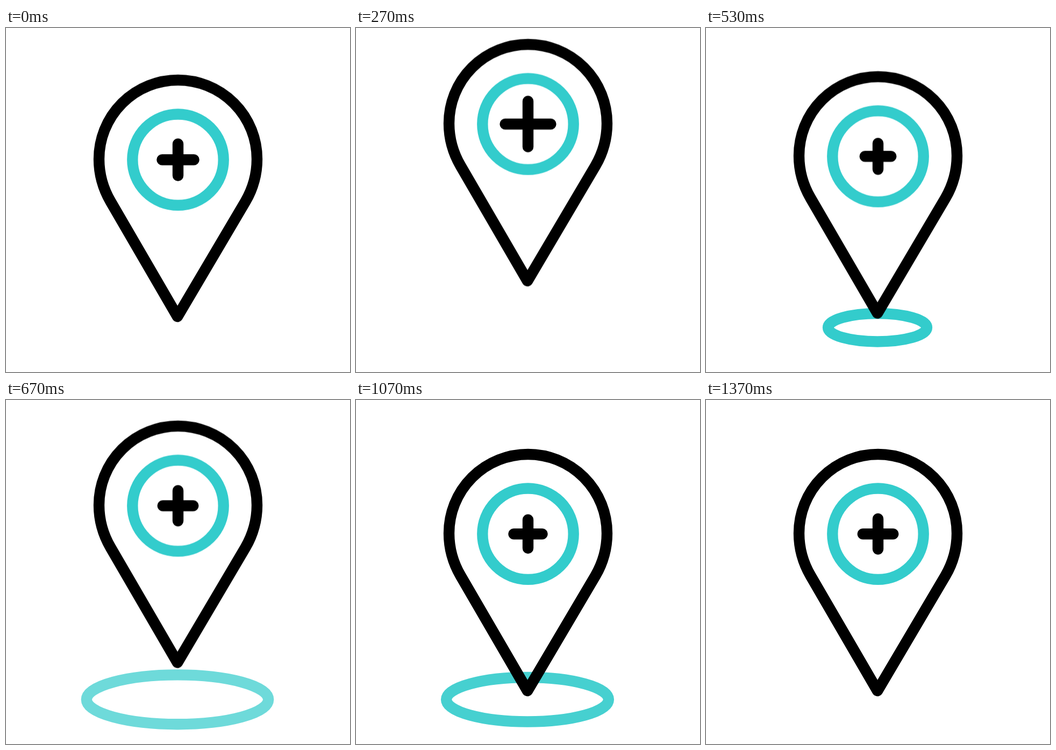
Write an HTML page that moves like this. It is 640 px wide and 640 px high and loops after 1670 ms.

```html
<!DOCTYPE html>
<html lang="en">
<head>
<meta charset="utf-8">
<title>Map pin</title>
<style>
  html, body { margin: 0; width: 100%; height: 100%; overflow: hidden; background: #fff; }
  svg { display: block; width: 100%; height: 100%; }

  .stroke {
    fill: none;
    stroke: #000;
    stroke-width: 20.4px;
    stroke-linecap: round;
    stroke-linejoin: round;
  }
  .teal { stroke: #3cc; }

  .pin, .plus, .ripple {
    --ease: cubic-bezier(.333, 0, .667, 1);
    animation: 1670ms var(--ease) -35ms infinite;
  }
  .pin { animation-name: bounce; }
  .plus { d: path("M-28.3 0H28.3M0 -28.3V28.3"); animation-name: throb; }
  .ripple { opacity: 0; animation-name: spread, fade; animation-timing-function: linear, var(--ease); }

  @keyframes bounce {
    0% { transform: translateY(0); animation-timing-function: cubic-bezier(.333, .04, .667, .96); }
    16.6% { transform: translateY(-73.5px); }
    30.9% { transform: translateY(0); }
    41.4% { transform: translateY(-53px); }
    56.8%, 100% { transform: translateY(0); }
  }

  @keyframes throb {
    0%, 42%, 84%, 100% { d: path("M-28.3 0H28.3M0 -28.3V28.3"); }
    14%, 56% { d: path("M-48.5 0H48.5M0 -48.5V48.5"); }
    28%, 70% { d: path("M-21.8 0H21.8M0 -21.8V21.8"); }
  }

  /* Two ripples, one per landing */
  @keyframes spread {
    0%, 24.3%, 50% { rx: 3.6px; ry: 3.6px; }
    44.7%, 49.99%, 70.7%, 100% { rx: 191.5px; ry: 51.6px; }
  }

  @keyframes fade {
    0%, 24.3%, 50%, 76%, 100% { opacity: 0; }
    30%, 38%, 56%, 64% { opacity: 1; }
  }
</style>
</head>
<body>
<svg viewBox="0 0 640 640">
  <ellipse class="stroke teal ripple" cx="319" cy="557.3" rx="3.6" ry="3.6"/>
  <g class="pin">
    <path class="stroke" d="M319 541L194.6 327C183 307 173 281 173 247.9A147 147 0 0 1 467 247.9C467 281 457 307 445.4 327Z"/>
    <circle class="stroke teal" cx="320" cy="249.2" r="84.7"/>
    <g transform="translate(320 249.2)">
      <path class="stroke plus" d="M-28.3 0H28.3M0 -28.3V28.3"/>
    </g>
  </g>
</svg>
</body>
</html>
```
